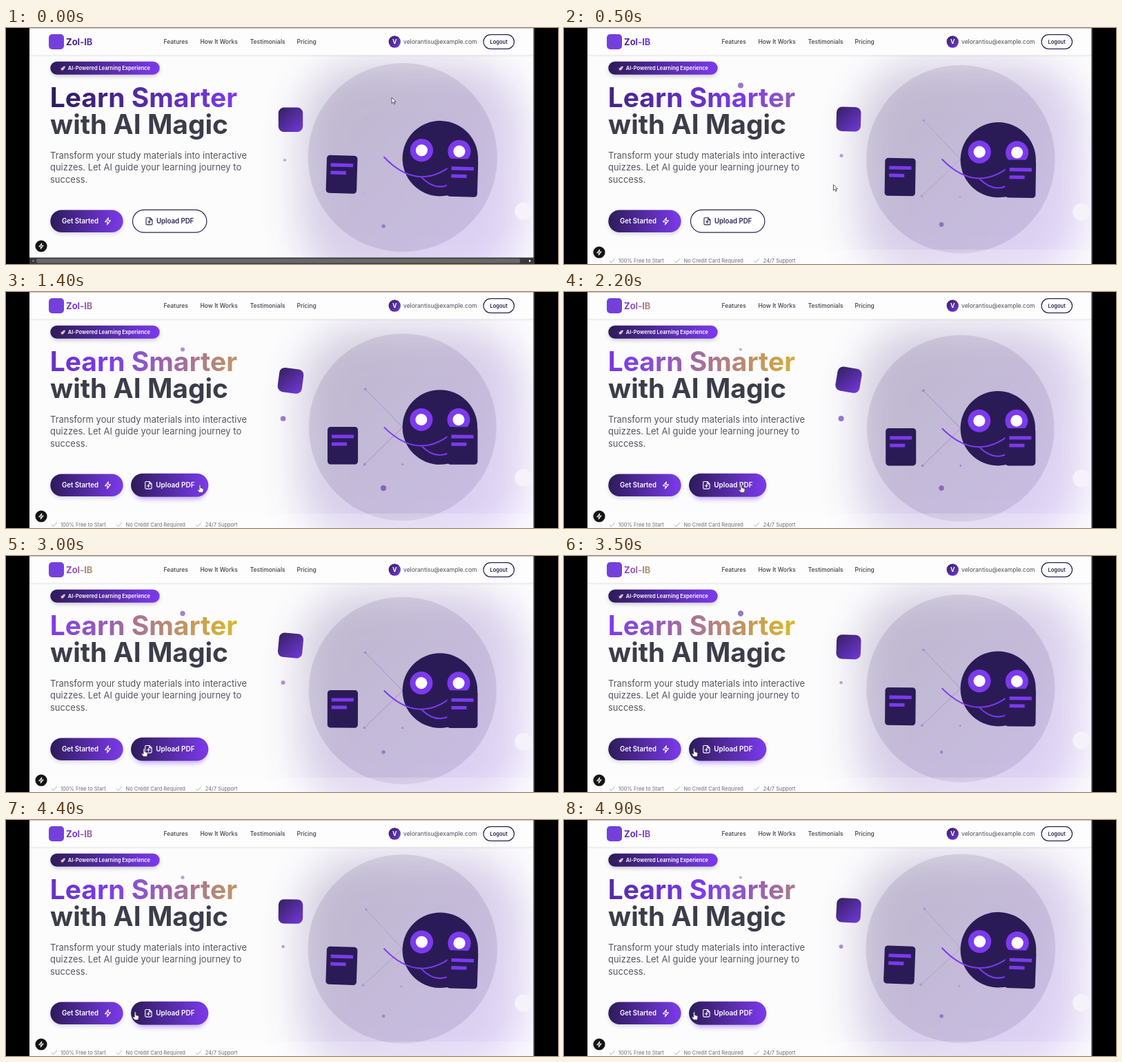
Write an HTML page that moves like this. It is 800x343 px and loops after 5000 ms.

```html
<!DOCTYPE html>
<html lang="en">
<head>
<meta charset="utf-8">
<title>Learn Smarter</title>
<style>
  html, body { margin: 0; width: 100%; height: 100%; overflow: hidden; background: #000; }
  svg { display: block; width: 100vw; height: 100vh; }
  text { font-family: Inter, "Liberation Sans", sans-serif; font-optical-sizing: none; white-space: pre; }
  .nav { font-size: 8.5px; font-weight: 450; fill: #3f3f4a; }
  .title { font-size: 39px; font-weight: 700; }
  .lead { font-size: 12.98px; fill: #55565f; }
  .btn { font-size: 9.65px; font-weight: 600; }
  .perk { font-size: 7.5px; fill: #6b6b76; }
  .line { fill: none; stroke-linecap: round; stroke-linejoin: round; }
</style>
</head>
<body>
<svg viewBox="0 0 800 343" preserveAspectRatio="none">
  <defs>
    <linearGradient id="brand">
      <stop offset="0" stop-color="#2d1b5a"/><stop offset="1" stop-color="#7c3aed"/>
    </linearGradient>
    <linearGradient id="tile" x2="1" y2="1">
      <stop offset="0" stop-color="#34205f"/><stop offset="1" stop-color="#7239dc"/>
    </linearGradient>
    <linearGradient id="haze" x2="1" y2="1">
      <stop offset="0" stop-color="#2d1b5a"/><stop offset="1" stop-color="#7c3aed"/>
    </linearGradient>
    <linearGradient id="shineTitle" gradientUnits="userSpaceOnUse" y1="0" y2="0">
      <stop offset="0" stop-color="#2d1b5a"/><stop offset=".5" stop-color="#7c3aed"/><stop offset="1" stop-color="#dcb92a"/>
    </linearGradient>
    <linearGradient id="shineLogo" gradientUnits="userSpaceOnUse" y1="0" y2="0">
      <stop offset="0" stop-color="#2d1b5a"/><stop offset=".5" stop-color="#7c3aed"/><stop offset="1" stop-color="#dcb92a"/>
    </linearGradient>
    <filter id="blur" x="-40%" y="-40%" width="180%" height="180%"><feGaussianBlur stdDeviation="29"/></filter>
    <filter id="soft" x="-30%" y="-60%" width="160%" height="220%"><feGaussianBlur stdDeviation="3"/></filter>
    <clipPath id="page"><rect x="34" width="732" height="343"/></clipPath>
    <path id="bolt" class="line" d="M1 -5L-4 1H0L-1 5L4 -1H0Z"/>
    <path id="check" class="line" d="M0 0L2.4 2.4L7.4 -3" stroke="#7fbf7c" stroke-width=".9"/>
    <g id="note">
      <rect width="44" height="54.5" rx="4.5" fill="#2a1b56"/>
      <path d="M6 11.5h32v5h-32zM6 22.5h22v5h-22z" fill="#7c3aed"/>
    </g>
    <g id="eye"><circle r="16.5" fill="#7c3aed"/><circle r="8.5" fill="#fff"/></g>
  </defs>

  <rect width="800" height="343"/>
  <g clip-path="url(#page)">
    <rect x="34" width="732" height="343" fill="#fcfcfd"/>
    <rect x="426" y="50" width="324" height="324" rx="95" fill="url(#haze)" opacity=".21" filter="url(#blur)"/>

    <g id="scene">
      <circle r="135.7" fill="#2d1b5a" opacity=".115"/>
      <g id="links" fill="#8a6cc4" stroke="#957bca">
        <path d="M-54 -55L0 0L-55 54" fill="none" opacity=".7"/>
        <circle cx="-54" cy="-55" r="1.4"/><circle cx="-55" cy="54" r="1.4"/><circle cy="54" r="1"/>
      </g>
      <circle cx="54" r="54.2" fill="#2a1b56"/>
      <use href="#eye" x="27" y="-11"/>
      <use href="#eye" x="81" y="-11"/>
      <path d="M-27 0Q27 54 81 0M27 27Q54 54 81 27" fill="none" stroke="#7c3aed" stroke-width="2"/>
      <use href="#note" x="-108.6" y="-.4"/>
      <use href="#note" x="64.5" y="-.4"/>
    </g>
    <circle id="pearl" cx="750" r="12.7" fill="#f5f3f9"/>
    <rect id="cube" x="-17.7" y="-17.7" width="35.4" height="35.4" rx="8" fill="url(#tile)"/>

    <rect id="band" x="34" y="322" width="732" height="21" fill="#fff" opacity=".22"/>

    <rect x="34" y="39" width="732" height="3" fill="#000" opacity=".025"/>
    <rect x="34" width="732" height="39.5" fill="#fdfdfe"/>
    <rect x="34" y="39.3" width="732" height=".8" fill="#e4e3e9"/>
    <rect x="34" width="732" height=".7" fill="#aaa"/>
    <rect x="62" y="9" width="22" height="22" rx="5" fill="#7440dc"/>
    <text x="87" y="24.5" font-size="13" font-weight="700" fill="url(#shineLogo)">Zol-IB</text>
    <g class="nav">
      <text class="nav" x="228.5" y="23.2">Features</text>
      <text class="nav" x="281.5" y="23.2">How It Works</text>
      <text class="nav" x="353.7" y="23.2">Testimonials</text>
      <text class="nav" x="421.5" y="23.2">Pricing</text>
    </g>
    <circle cx="563.2" cy="20" r="8.7" fill="url(#tile)"/>
    <text x="563.2" y="23.1" font-size="8.7" font-weight="700" fill="#fff" text-anchor="middle">V</text>
    <text x="576" y="23.2" font-size="8.55" fill="#4b4b57">velorantisu@example.com</text>
    <rect x="692" y="9.7" width="44.5" height="20.6" rx="10.3" fill="#fff" stroke="#2d2350" stroke-width="1.2"/>
    <text x="714.2" y="22.8" font-size="7.5" font-weight="600" fill="#2d2350" text-anchor="middle">Logout</text>

    <rect x="65" y="51" width="157" height="19" rx="9.5" fill="#2d1b5a" opacity=".25" filter="url(#soft)"/>
    <rect x="64.3" y="48.8" width="158.4" height="19" rx="9.5" fill="url(#brand)"/>
    <g transform="translate(82.5 58.7) rotate(45)">
      <path d="M0 -4.6Q2.3 -2 1.6 2.4H-1.6Q-2.3 -2 0 -4.6Z" fill="#e4e5ec"/>
      <path d="M-1.6 .4L-3.2 3L-1.5 2.4ZM1.6 .4L3.2 3L1.5 2.4Z" fill="#d9455c"/>
      <circle cy="-1.2" r=".8" fill="#4c79b8"/><path d="M-1 2.6H1L0 4.6Z" fill="#f0a63c"/>
    </g>
    <text x="89.8" y="61.4" font-size="7.5" font-weight="600" fill="#fff">AI-Powered Learning Experience</text>

    <text class="title" x="63.7" y="115" fill="url(#shineTitle)">Learn Smarter</text>
    <text class="title" x="64" y="154.2" fill="#3b3d4a">with AI Magic</text>
    <text class="lead" x="64" y="189.8">Transform your study materials into interactive</text>
    <text class="lead" x="64" y="207.2">quizzes. Let AI guide your learning journey to</text>
    <text class="lead" x="64" y="224.6">success.</text>

    <g id="dots" fill="#6b3fb0"><circle/><circle/><circle/></g>

    <rect x="65" y="268" width="104" height="31" rx="15.5" fill="#2d1b5a" opacity=".2" filter="url(#soft)"/>
    <rect x="64.3" y="264.5" width="105.4" height="32.4" rx="16.2" fill="url(#brand)"/>
    <text class="btn" x="81" y="284.2" fill="#fff">Get Started</text>
    <use href="#bolt" x="147.5" y="280.8" stroke="#fff" stroke-width="1.1"/>

    <g id="upload">
      <rect id="glow" x="-52" y="-12" width="104" height="32" rx="16" fill="#7c3aed" filter="url(#soft)"/>
      <rect id="plain" x="-53.7" y="-16.3" width="107.4" height="32.8" rx="16.4" fill="#fff" stroke="#2d2350" stroke-width="1.2"/>
      <rect id="fill" x="-54.2" y="-16.3" width="108.4" height="32.8" rx="16.4" fill="url(#brand)"/>
      <g id="label">
        <text class="btn" x="-19.3" y="3.4" fill="currentColor">Upload PDF</text>
        <path class="line" d="M-28.4 -5H-33a1.2 1.2 0 0 0 -1.2 1.2V4a1.2 1.2 0 0 0 1.2 1.2h6.6A1.2 1.2 0 0 0 -25.2 4V-1.8ZM-28.4 -5V-1.8H-25.2M-29.7 -1V3M-31.7 1H-27.7" stroke="currentColor" stroke-width="1.1"/>
      </g>
    </g>

    <use href="#check" x="66" y="338.5"/>
    <text class="perk" x="79" y="341">100% Free to Start</text>
    <use href="#check" x="160.3" y="338.5"/>
    <text class="perk" x="173.5" y="341">No Credit Card Required</text>
    <use href="#check" x="275.3" y="338.5"/>
    <text class="perk" x="288.8" y="341">24/7 Support</text>

    <g id="badge">
      <circle r="8.6" fill="#141416"/>
      <use href="#bolt" transform="scale(.78)" stroke="#fff" stroke-width="1.3"/>
    </g>

    <rect x="764.3" width="1.7" height="343" fill="#4a4a50"/>
    <g id="bar">
      <rect x="34" y="333.6" width="732" height="10" fill="#38383a"/>
      <rect x="44" y="335.2" width="701" height="6.6" rx="2" fill="#68686a"/>
      <path d="M40.5 336.5V340.5L37.5 338.5Z" fill="#8a8a8c"/><path d="M758 336.5V340.5L761 338.5Z" fill="#fff"/>
    </g>

    <g id="cursor" stroke="#35343f" stroke-width=".8" fill="#fff" stroke-linejoin="round">
      <path id="arrow" d="M0 0V8.4L2 6.7L3.4 9.8L4.8 9.1L3.4 6.2H6Z"/>
      <path id="hand" d="M-1 .8a1 1 0 0 1 2 0V4.6L4.2 5.4Q5.5 5.8 5.2 7.4L4.4 11.6H-.6L-3.8 7.8Q-3.2 6.2 -1 7.8Z"/>
    </g>
  </g>
</svg>
<script>
const LOOP = 5000, STEP = 100;
const $ = id => document.getElementById(id);
const set = (el, attrs) => { for (const k in attrs) el.setAttribute(k, attrs[k]); };
const clamp = x => Math.min(1, Math.max(0, x));
const smooth = x => x * x * (3 - 2 * x);
const ramp = (t, start, length) => clamp((t - start) / length);
const wave = (t, peak, period) => Math.cos(2 * Math.PI * (t - peak) / period);
const ease = x => smooth(Math.sqrt(x));

// Piecewise path through [time, ...values]
function along(points, t) {
  const i = Math.max(1, points.findIndex(p => p[0] >= t));
  const a = points[i - 1], b = points[i];
  const k = clamp((t - a[0]) / (b[0] - a[0]));
  return a.slice(1).map((v, j) => v + (b[j + 1] - v) * k);
}

const cursorPath = [[0, 559, 101], [150, 540, 115], [700, 305, 292], [900, 285, 297], [1200, 282, 283],
  [1400, 281, 280], [2200, 257, 280], [3000, 200, 280], [3700, 184, 280], [4000, 186, 279], [5000, 189, 279]];
const hoverPath = [[0, 0], [800, 0], [900, 0.2], [1100, 0.9], [1200, 1], [3700, 1], [3850, 0.4],
  [4000, 0.75], [4200, 1], [5000, 1]];

// x, y, pulse peak, pulse period, initial offset
const dots = [
  [401.6, 184, 1900, 4100, 2.4, 8],
  [547, 285, 1500, 4800, 0, 3],
  [256, 83.5, 700, 2750, 0, 0]
];

function shine(id, x, width, s) {
  const x1 = x - s * width;
  set($(id), { x1, x2: x1 + 2 * width });
}

function drawScene(t) {
  const c = wave(t, 2120, 5470), lift = (1 - c) / 2;
  const y = 192.5 + 5.8 * c;
  set($('scene'), { transform: `translate(574.8 ${y}) rotate(${2.1 * lift * lift}) scale(${1 + 0.012 * lift})` });
  set($('links'), { opacity: (0.2 + 0.8 * ramp(t, 0, 700)) * (0.75 - 0.3 * lift) });
  set($('pearl'), { cy: 268.3 + 2.7 * c });
  const q = wave(t, 0, 4100);
  set($('cube'), { transform: `translate(412.5 ${130.4 + 2.9 * q}) rotate(${4.8 * (1 - q)})` });
}

function drawDots(t) {
  const settle = 1 - smooth(ramp(t, 0, 700));
  dots.forEach(([x, y, peak, period, dx, dy], i) => {
    const c = wave(t, peak, period);
    const shown = i === 2 ? ramp(t, 0, 400) : 1;
    set($('dots').children[i], {
      cx: x + dx * settle, cy: y + dy * settle, r: 3.1 + 1.05 * c, opacity: shown * (0.56 + 0.14 * c)
    });
  });
}

function drawUpload(t) {
  const [h] = along(hoverPath, t);
  const tint = Math.pow(h, 0.7);
  const mix = (a, b) => Math.round(a + (b - a) * tint);
  set($('upload'), { transform: `translate(237.2 280.7) scale(${1 + 0.036 * h})` });
  set($('glow'), { opacity: 0.4 * h });
  set($('fill'), { opacity: h });
  set($('plain'), { 'stroke-opacity': clamp(1 - 2 * h) });
  $('label').style.color = `rgb(${mix(45, 255)},${mix(35, 255)},${mix(80, 255)})`;
}

function draw(t) {
  drawScene(t);
  drawDots(t);
  drawUpload(t);
  const s = ease(ramp(t, 150, 3000)) - ease(ramp(t, 3900, 4000));
  shine('shineTitle', 64, 271, s);
  shine('shineLogo', 87, 52, s);
  const [x, y] = along(cursorPath, t);
  set($('cursor'), { transform: `translate(${x} ${y})` });
  const over = t >= 1100;
  $('arrow').style.display = over ? 'none' : '';
  $('hand').style.display = over ? '' : 'none';
  const scrolling = t < 500;
  $('bar').style.display = scrolling ? '' : 'none';
  $('band').style.display = scrolling ? 'none' : '';
  set($('badge'), { transform: `translate(51 ${scrolling ? 317 : 326})` });
}

const begin = performance.now();
function tick() {
  const t = (performance.now() - begin) % LOOP;
  draw(Math.floor(t / STEP) * STEP);
  requestAnimationFrame(tick);
}
tick();
</script>
</body>
</html>
```
